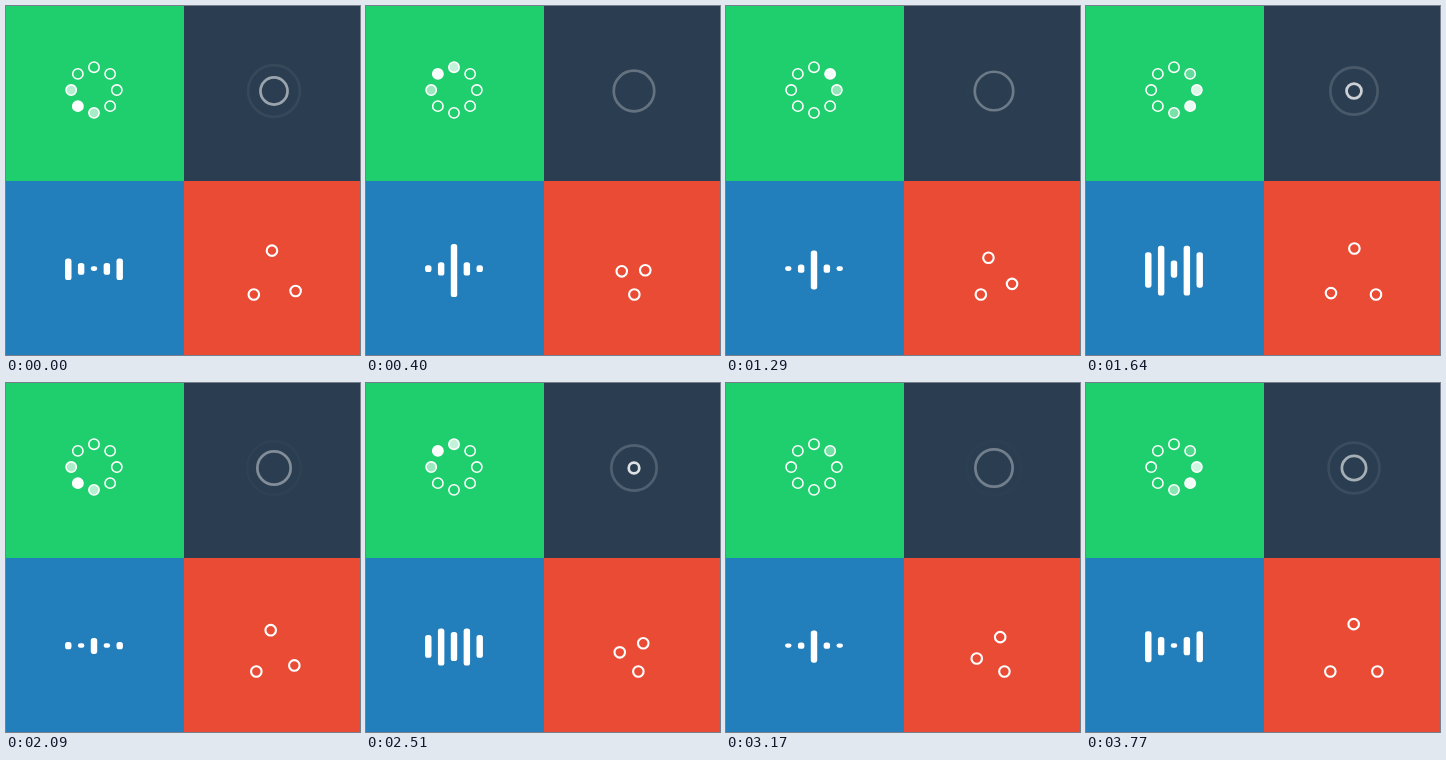
These frames come from a looping animation (354 px wide and 349 px high, 3.87 s). An HTML page with a canvas:

```html
<!DOCTYPE html>
<html lang="en">
<head>
<meta charset="utf-8">
<title>Loaders</title>
<style>
html, body { margin: 0; width: 100%; height: 100%; overflow: hidden; }
canvas { display: block; }
</style>
</head>
<body>
<canvas width="354" height="349"></canvas>
<script>
const LOOP = 3870;
const ctx = document.querySelector('canvas').getContext('2d');
const easeOut = p => 1 - (1 - p) ** 2;
const mix = (a, b, p) => a + (b - a) * p;

// Runs draw inside one coloured cell, with a loader box of 60px at (left, top).
function cell(x, y, w, h, color, left, top, scale, draw) {
  ctx.fillStyle = color;
  ctx.fillRect(x, y, w, h);
  ctx.save();
  ctx.translate(left, top);
  ctx.scale(scale, scale);
  ctx.strokeStyle = ctx.fillStyle = '#fff';
  draw();
  ctx.restore();
}

function circle(x, y, r, strokeAlpha = 1, fillAlpha = 0) {
  ctx.beginPath();
  ctx.arc(x, y, r, 0, 2 * Math.PI);
  ctx.globalAlpha = fillAlpha;
  ctx.fill();
  ctx.globalAlpha = strokeAlpha;
  ctx.stroke();
  ctx.globalAlpha = 1;
}

function spinner(t) {
  ctx.lineWidth = 1.5;
  const head = (t / 190 + 6.05) % 11.1 - 2;
  for (let i = 0; i < 8; i++) {
    const angle = (i - 1) * Math.PI / 4;
    const gap = Math.min(1, Math.abs(head - i) / 2);
    circle(29 + 22.06 * Math.cos(angle), 28.06 + 22.06 * Math.sin(angle), 5, 1, 1 - gap ** 1.5);
  }
}

function puff(t) {
  ctx.lineWidth = 2;
  for (const offset of [0.271, 0.771]) {
    const p = easeOut((t / 1920 + offset) % 1);
    circle(22, 22, mix(1, 20, p), 1 - p);
  }
}

function bars(t) {
  const peaks = [0.803, 0.7, 0.45, 0.7, 0.803];
  peaks.forEach((peak, i) => {
    const d = Math.abs((t / 960 - peak + 1.5) % 1 - 0.5);
    const level = (1 - 2 * d) ** 2;
    const tall = i === 2;
    const y = mix(60, tall ? 0 : 10, level);
    const height = mix(10, tall ? 140 : 120, level);
    ctx.beginPath();
    ctx.roundRect(2.5 + i * 30, y, 15, height, [Math.min(6, height / 2)]);
    ctx.fill();
  });
}

function triangle(t) {
  ctx.lineWidth = 2;
  const corners = [[6, 51], [28.2, 6], [50.7, 51]];
  const p = easeOut((t / 717 + 0.726) % 1);
  corners.forEach(([x, y], i) => {
    const [nextX, nextY] = corners[(i + 1) % 3];
    circle(mix(x, nextX, p), mix(y, nextY, p), 5);
  });
}

function frame(now) {
  const t = now % LOOP;
  cell(0, 0, 178, 175, '#1fce6d', 58, 55, 60 / 58, () => spinner(t));
  cell(178, 0, 176, 175, '#2b3e51', 238, 55, 60 / 44, () => puff(t));
  cell(0, 175, 178, 174, '#227fbb', 58, 234.7, 60 / 140, () => bars(t));
  cell(178, 175, 176, 174, '#ea4b35', 238, 234.8, 60 / 57, () => triangle(t));
  requestAnimationFrame(frame);
}
frame(performance.now());
</script>
</body>
</html>
```
